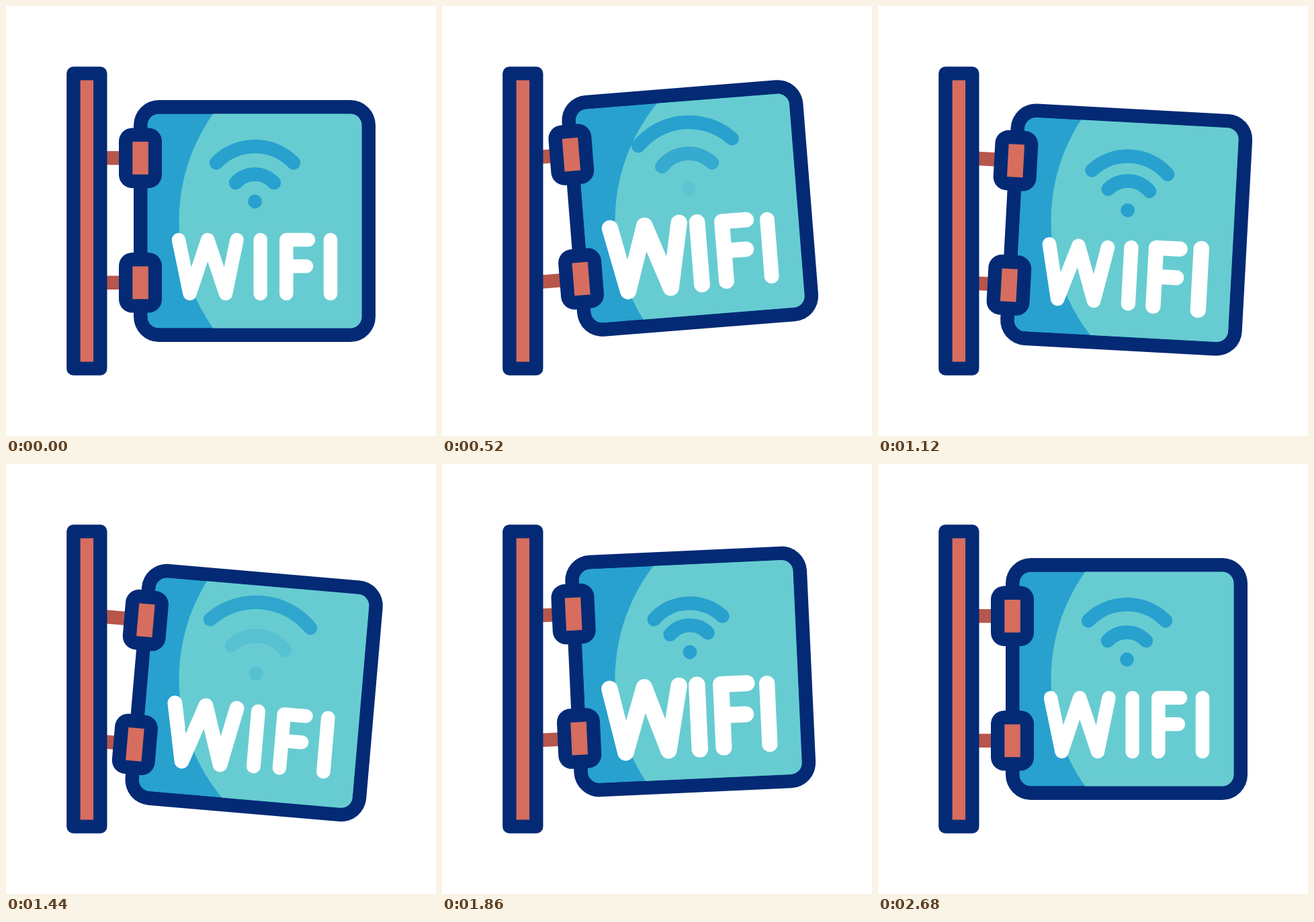
An HTML page with a canvas for the animation above (3600 ms loop, 640 by 640 pixels).

```html
<!DOCTYPE html>
<html lang="en">
<head>
<meta charset="utf-8">
<title>Swinging sign</title>
<style>
  html, body { margin: 0; width: 100%; height: 100%; overflow: hidden; background: #fff; }
  canvas { display: block; width: 640px; height: 640px; }
</style>
</head>
<body>
<canvas id="stage" width="640" height="640"></canvas>
<script>
const ctx = document.getElementById('stage').getContext('2d');
const LOOP = 3600, STEP = 20;
const NAVY = '#042a75', RED = '#d66d5f', ROD = '#b7564b';
const LIGHT = '#67ccd1', BLUE = '#28a1cf';
const PIVOT = { x: 131, y: 320 };

const clamp = (v, lo, hi) => Math.min(hi, Math.max(lo, v));
const wave = u => (1 - Math.cos(Math.PI * u)) / 2;

// Turning points of the swing: [ms, degrees]
const SWING = [[60, 0], [310, 0.4], [615, -5.95], [1350, 5.7], [1815, -2.9], [2075, 0.75], [2300, 0]];

function swingAngle(t) {
  if (t <= SWING[0][0]) return 0;
  for (let i = 1; i < SWING.length; i++) {
    const [t0, a0] = SWING[i - 1], [t1, a1] = SWING[i];
    if (t < t1) return a0 + (a1 - a0) * wave((t - t0) / (t1 - t0));
  }
  return 0;
}

// Letter strokes, each scaled about its own centre
const LETTERS = [
  { cx: 300.2, lines: [[[257, 348], [273.5, 428], [300.2, 348], [327, 428], [343.5, 348]]] },
  { cx: 378.7, lines: [[[378.7, 348], [378.7, 428]]] },
  { cx: 433.5, lines: [[[417.3, 428], [417.3, 348], [450, 348]], [[417.3, 387.3], [447, 387.3]]] },
  { cx: 483, lines: [[[483, 348], [483, 428]]] }
];
const LETTER_Y = 388, PULSE = 1200, STAGGER = 100;

function letterScale(t, index) {
  const local = clamp(t - index * STAGGER, 0, 2 * PULSE);
  return 1 + 0.2 * wave(2 * local / PULSE);
}

// Signal rings grow steadily, fade out when large and return small, twice over
const RING_X = 370.5, RING_Y = 289, SPAN = 0.835, MAX_SIZE = 1.45;

function ringState(t, delay) {
  let size = 1 + clamp((t - delay) * 0.001, 0, 2 * SPAN);
  while (size > MAX_SIZE) size -= SPAN;
  const fadeIn = clamp((size - 0.615) / 0.2, 0, 1);
  const fadeOut = clamp((1.44 - size) / 0.16, 0, 1);
  return { size, alpha: Math.min(fadeIn, fadeOut) };
}

function box(x, y, w, h, r, color) {
  ctx.beginPath();
  ctx.roundRect(x, y, w, h, r);
  ctx.fillStyle = color;
  ctx.fill();
}

function disc(x, y, r, color) {
  ctx.beginPath();
  ctx.arc(x, y, r, 0, 2 * Math.PI);
  ctx.fillStyle = color;
  ctx.fill();
}

function swing(angle) {
  ctx.translate(PIVOT.x, PIVOT.y);
  ctx.rotate(angle);
  ctx.translate(-PIVOT.x, -PIVOT.y);
}

function drawPanel(angle) {
  box(190, 140, 360, 360, 37.5, NAVY);
  ctx.save();
  ctx.beginPath();
  ctx.roundRect(210.3, 160.4, 319.2, 319.2, 17);
  ctx.clip();
  ctx.fillStyle = BLUE;
  ctx.fill();
  // The light disc stays still while the panel swings across it
  swing(-angle);
  disc(534, 320, 276.5, LIGHT);
  ctx.restore();
}

function drawSignal(t) {
  ctx.strokeStyle = BLUE;
  ctx.lineWidth = 20.5;
  ctx.globalAlpha = ringState(t, 105).alpha;
  disc(RING_X, 291, 10.4, BLUE);
  for (const [radius, delay, spread] of [[38.5, 205, 0.833], [80, 305, 0.803]]) {
    const { size, alpha } = ringState(t, delay);
    ctx.globalAlpha = alpha;
    ctx.beginPath();
    ctx.arc(RING_X, RING_Y, radius * size, -Math.PI / 2 - spread, -Math.PI / 2 + spread);
    ctx.stroke();
  }
  ctx.globalAlpha = 1;
}

function drawLetters(t) {
  ctx.strokeStyle = '#fff';
  ctx.lineWidth = 20.5;
  LETTERS.forEach(({ cx, lines }, i) => {
    const s = letterScale(t, i);
    ctx.save();
    ctx.translate(cx, LETTER_Y);
    ctx.scale(s, s);
    ctx.translate(-cx, -LETTER_Y);
    ctx.beginPath();
    for (const [start, ...rest] of lines) {
      ctx.moveTo(...start);
      rest.forEach(p => ctx.lineTo(...p));
    }
    ctx.stroke();
    ctx.restore();
  });
}

function drawBrackets() {
  for (const y of [226.3, 411.8]) {
    box(168, y - 44.8, 64, 89.6, 20, NAVY);
    box(188.3, y - 24.4, 23.5, 48.8, 0, RED);
  }
}

function draw(t) {
  const angle = swingAngle(t) * Math.PI / 180;
  ctx.fillStyle = '#fff';
  ctx.fillRect(0, 0, 640, 640);
  ctx.lineCap = ctx.lineJoin = 'round';

  ctx.save();
  swing(angle);
  for (const y of [216, 401.5]) box(125, y, 60, 20.4, 0, ROD);
  drawPanel(angle);
  drawBrackets();
  drawSignal(t);
  drawLetters(t);
  ctx.restore();

  box(90.2, 90.2, 60.3, 459.6, 10, NAVY);
  box(110.6, 110.6, 19.5, 418.8, 0, RED);
}

const begin = performance.now();
function tick() {
  const t = (performance.now() - begin) % LOOP;
  draw(Math.floor(t / STEP) * STEP);
  requestAnimationFrame(tick);
}
tick();
</script>
</body>
</html>
```
